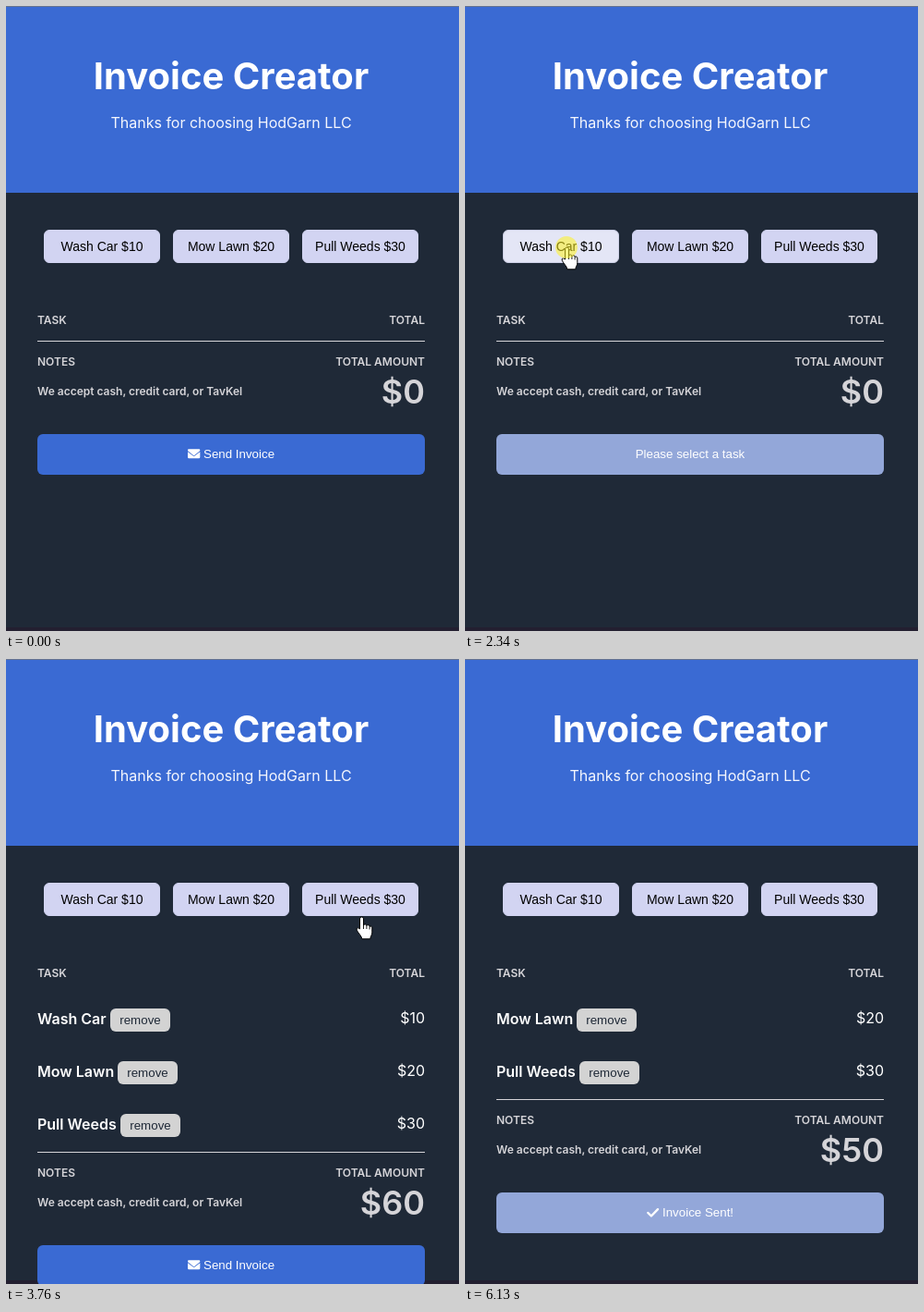
These frames come from a looping animation (491x676 px, 6.99 s). An HTML page:

```html
<!DOCTYPE html>
<html lang="en">
<head>
<meta charset="utf-8">
<title>Invoice Creator</title>
<style>
  html, body { margin: 0; width: 100%; height: 100%; overflow: hidden; background: #1f2937; }
  svg { display: block; width: 491px; height: 676px; }
  text { font-family: Inter, sans-serif; font-optical-sizing: none; white-space: pre; }
  .title { font-size: 40px; font-weight: 700; fill: #fff; }
  .sub { font-size: 16px; fill: #f4f6fd; }
  .label { font-size: 12px; font-weight: 600; fill: #d5d4d8; }
  .name { font-size: 16px; font-weight: 600; fill: #fff; }
  .price { font-size: 16px; fill: #fff; }
  .sum { font-size: 36px; font-weight: 600; fill: #d5d4d8; }
  .btn, .small { font-family: "Liberation Sans", Arial, sans-serif; }
  .btn { font-size: 14px; fill: #000; }
  .small { font-size: 13.333px; }
  .mid { text-anchor: middle; }
  .end { text-anchor: end; }
</style>
</head>
<body>
<svg id="stage" viewBox="0 0 491 676">
  <rect width="491" height="676" fill="#1f2937"/>
  <rect y="672" width="491" height="4" fill="#231f30"/>
  <rect width="491" height="202" fill="#3a6ad3"/>
  <rect width="491" height="1" fill="#66738f"/>
  <text class="title mid" x="244" y="90">Invoice Creator</text>
  <text class="sub mid" x="244" y="132">Thanks for choosing HodGarn LLC</text>
  <g id="tasks"></g>
  <text class="label" x="34" y="344">TASK</text>
  <text class="label end" x="454" y="344">TOTAL</text>
  <g id="rows"></g>
  <g id="foot">
    <rect x="34" y="362" width="420" height="1" fill="#d5d4d8"/>
    <text class="label" x="34" y="389">NOTES</text>
    <text class="label end" x="454" y="389">TOTAL AMOUNT</text>
    <text class="label" x="34" y="421">We accept cash, credit card, or TavKel</text>
    <text class="sum end" id="sum" x="454" y="430"></text>
    <rect id="send" x="34" y="463" width="420" height="44" rx="6"/>
    <g id="mail" fill="#fff" transform="translate(197 477.7) scale(.02604)">
      <path d="M48 64C21 64 0 85 0 112c0 15 7 29 19 38L237 314c11 8 27 8 38 0L493 150c12-9 19-23 19-38c0-27-21-48-48-48z"/>
      <path d="M0 176V384c0 35 29 64 64 64H448c35 0 64-29 64-64V176L294 339c-23 17-54 17-76 0z"/>
    </g>
    <path id="check" d="M198.3 485l3.6 3.5 7.1-7.3" fill="none" stroke="#fff" stroke-width="2.4" stroke-linecap="round" stroke-linejoin="round"/>
    <text class="small" id="sendText" y="489" fill="#fff"></text>
  </g>
  <g id="cursor">
    <path d="M-1.5 13V2a2 2 0 0 1 4 0v7a1.8 1.8 0 0 1 3.4 .6a1.7 1.7 0 0 1 3.2 .9a1.6 1.6 0 0 1 2.7 1.3v5c0 3-2 4-2 7h-9c0-3-4-6-5.5-9.5c-.8-2.2 1-3 2-2z" fill="#fff" stroke="#000" stroke-linejoin="round"/>
    <path d="M2.5 9v4M5.9 9.6v3.4M9.1 10.5v3" stroke="#000" stroke-width=".9"/>
    <circle id="halo" r="12" fill="#fff21e" fill-opacity=".54"/>
  </g>
</svg>
<script>
const LOOP = 6990, ROW = 57;
const $ = id => document.getElementById(id);

const tasks = [
  { name: 'Wash Car', price: 10, x: 41, remove: 113 },
  { name: 'Mow Lawn', price: 20, x: 181, remove: 121 },
  { name: 'Pull Weeds', price: 30, x: 321, remove: 124 }
];

// time, tasks on the invoice
const lists = [[0, []], [2540, [0]], [2950, [0, 1]], [3500, [0, 1, 2]], [4430, [1, 2]]];
// time, state of the send button
const sends = [[0, 'ready'], [1260, 'empty'], [2540, 'ready'], [5650, 'sent']];
const labels = { ready: 'Send Invoice', empty: 'Please select a task', sent: 'Invoice Sent!' };
const clicks = [[1130, 1260], [2340, 2470], [2810, 2950], [3310, 3500], [4370, 4430], [5460, 5650]];

// start, end, steps, target, optional bend
const entry = [454, 678];
const moves = [
  [460, 1060, 10, [306, 491]],
  [1860, 2280, 7, [110, 261], [222, 294]],
  [2610, 2810, 4, [258, 264]],
  [2950, 3230, 5, [411, 266]],
  [3640, 4240, 10, [163, 393]],
  [4770, 5180, 7, [287, 603]],
  [5260, 5330, 2, [294, 611]],
  [5390, 5460, 2, [287, 603]],
  [5850, 6060, 4, [362, 664]]
];
const SHOW = 460, HIDE = 6130;

function add(parent, tag, attrs, text) {
  const el = document.createElementNS('http://www.w3.org/2000/svg', tag);
  for (const k in attrs) el.setAttribute(k, attrs[k]);
  if (text) el.textContent = text;
  return parent.appendChild(el);
}

for (const task of tasks) {
  task.box = add($('tasks'), 'rect', { x: task.x + .5, y: 242.5, width: 125, height: 35, rx: 5.5 });
  add($('tasks'), 'text', { class: 'btn mid', x: task.x + 63, y: 265 }, `${task.name} $${task.price}`);
  task.row = add($('rows'), 'g', {});
  add(task.row, 'text', { class: 'name', x: 34, y: 395 }, task.name);
  task.chip = add(task.row, 'rect', { x: task.remove, y: 378, width: 65, height: 25, rx: 6 });
  add(task.row, 'text', { class: 'small mid', x: task.remove + 32.5, y: 395, fill: '#1f2937' }, 'remove');
  add(task.row, 'text', { class: 'price end', x: 454, y: 394 }, '$' + task.price);
}

const at = (table, t) => table.filter(e => e[0] <= t).pop()[1];
const show = (el, on) => { el.style.display = on ? '' : 'none'; };
const ease = p => p * p * (3 - 2 * p);

function pointer(t) {
  let from = entry;
  for (const [t0, t1, n, to, bend] of moves) {
    if (t < t0) break;
    const k = Math.floor((t - t0) / (t1 - t0) * (n - 1) + .001) + 1;
    if (k < n) {
      const p = ease(k / n), q = 1 - p;
      return from.map((a, i) => bend
        ? q * q * a + 2 * q * p * bend[i] + p * p * to[i]
        : q * a + p * to[i]);
    }
    from = to;
  }
  return from;
}

function render(t) {
  const list = at(lists, t), state = at(sends, t);
  const visible = t >= SHOW && t < HIDE;
  const [px, py] = pointer(t);
  const over = (x, y, w, h) => visible && px >= x && px < x + w && py >= y && py < y + h;

  tasks.forEach((task, i) => {
    const hot = over(task.x, 242, 126, 36);
    task.box.setAttribute('fill', hot ? '#e4e6f6' : '#d2d4f2');
    task.box.setAttribute('stroke', hot ? '#cdd0e6' : '#d2d4f2');
    const pos = list.indexOf(i);
    show(task.row, pos >= 0);
    task.row.setAttribute('transform', `translate(0 ${pos * ROW})`);
    task.chip.setAttribute('fill', over(task.remove, 378 + pos * ROW, 65, 25) ? '#c6c7e2' : '#d3d3d3');
  });

  const shift = list.length * ROW;
  $('foot').setAttribute('transform', `translate(0 ${shift})`);
  $('sum').textContent = '$' + list.reduce((s, i) => s + tasks[i].price, 0);

  const late = t >= 4770 && t < 5520;
  const hot = over(34, 463 + shift, 420, 44) && !late;
  $('send').setAttribute('fill', state !== 'ready' ? '#93a7d9' : hot ? '#557fd8' : '#3a6ad3');
  $('sendText').textContent = labels[state];
  $('sendText').setAttribute('x', state === 'empty' ? 184.7 : 214);
  show($('mail'), state === 'ready');
  show($('check'), state === 'sent');

  show($('cursor'), visible);
  $('cursor').setAttribute('transform', `translate(${Math.round(px)} ${Math.round(py)})`);
  show($('halo'), clicks.some(([a, b]) => t >= a && t < b));
}

const start = performance.now();
function tick() {
  render((performance.now() - start) % LOOP);
  requestAnimationFrame(tick);
}
tick();
</script>
</body>
</html>
```
